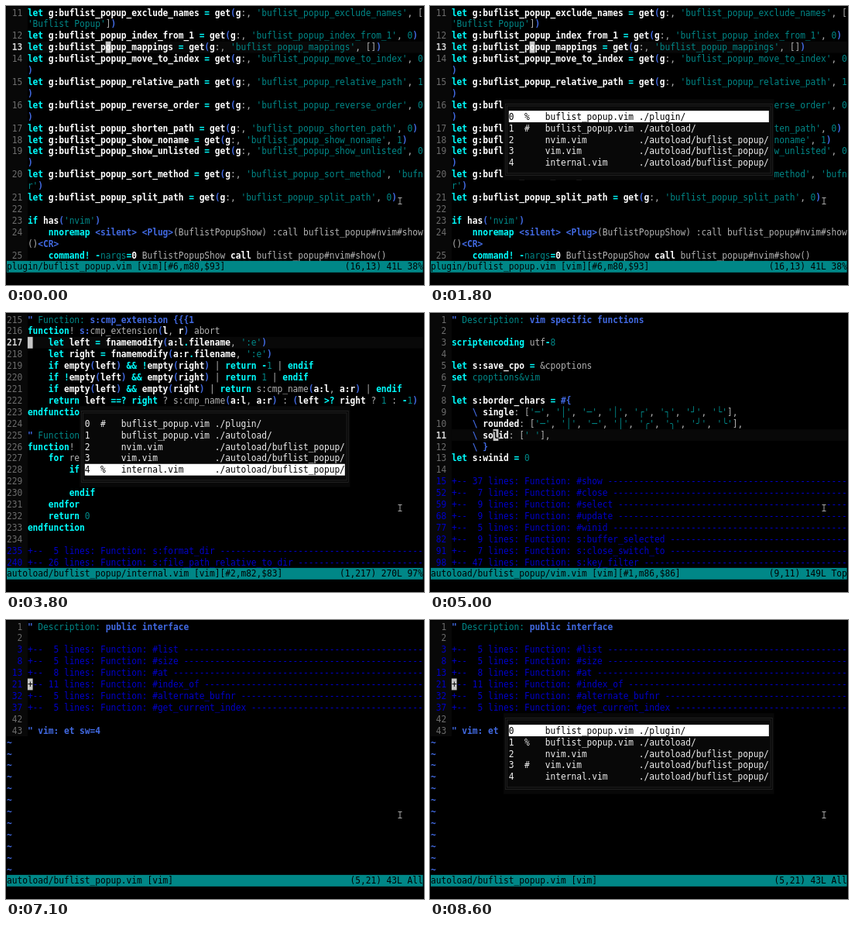
An HTML page with a canvas that plays this animation: 540 px wide and 360 px high, repeating every 10000 ms.

```html
<!DOCTYPE html>
<html lang="en">
<head>
<meta charset="utf-8">
<title>Buffer list popup</title>
<style>
html, body { margin: 0; width: 100%; height: 100%; overflow: hidden; background: #000; }
canvas { display: block; width: 540px; height: 360px; }
</style>
</head>
<body>
<canvas id="stage" width="540" height="360"></canvas>
<script>
const ctx = document.getElementById('stage').getContext('2d');
const LOOP = 10000, COLS = 80, GUTTER = 4, STATUS_ROW = 22;
const CW = 9, CH = 18, BASE = 14;
const FONT = '15px "DejaVu Sans Mono", monospace';

// Style letters follow a "§" in the text below.
const STYLES = {
  n: ['#b2b2b2'], s: ['#008787'], k: ['#00ffff', 1], b: ['#ffffff', 1],
  o: ['#4169e1', 1], f: ['#0000c8'], g: ['#6c6c6c'], G: ['#d0d0d0', 1]
};

const fold = (count, name) => ({ count, name });
const option = (name, value) =>
  `§klet §bg:buflist_popup_${name} §k= §bget§o(§bg§n:, §s'buflist_popup_${name}'§n, ${value}§o)`;
const heading = (label, text) => `§o" §s${label}: §o${text}`;
const func = (name, a, b) => `§kfunction§n! §os:§n${name}§o(§b${a}§n, §b${b}§o) §nabort`;
const call = (fn, arg) => `§b${fn}§o(§b${arg}§o)`;
const side = (name, arg) =>
  `    §klet §b${name} §k= §bfnamemodify§o(§ba:${arg}§k.§bfilename§n, §s':e'§o)`;
const cmpName = '§ns:cmp_name§o(§ba:l§n, §ba:r§o)';
const guard = (l, r, result) =>
  `    §kif ${l}${call('empty', 'left')} §k&& ${r}${call('empty', 'right')} §n| §kreturn ${result} §n| §kendif`;
const borders = (name, chars) =>
  `    §o\\ §b${name}§n: [` + [...chars].map(c => `§s'${c}'`).join('§n, ') + '§n],';

const views = {
  plugin: {
    first: 11, row: 3, col: 19, fill: 'let',
    path: 'plugin/buflist_popup.vim [vim][#6,m80,$93]', pos: '(16,13) 41L 38%',
    lines: [
      option('exclude_names', "[§s'Buflist Popup'§n]"),
      option('index_from_1', '§s0'),
      option('mappings', '[]'),
      option('move_to_index', '§s0'),
      option('relative_path', '§s1'),
      option('reverse_order', '§s0'),
      option('shorten_path', '§s0'),
      option('show_noname', '§s1'),
      option('show_unlisted', '§s0'),
      option('sort_method', "§s'bufnr'"),
      option('split_path', '§s0'),
      '',
      "§kif §bhas§o(§s'nvim'§o)",
      '    §knnoremap §o<silent> <Plug>§n(BuflistPopupShow) :call buflist_popup#nvim#show()§o<CR>',
      '    §kcommand! -§snargs§k=§b0 §nBuflistPopupShow §bcall §nbuflist_popup#nvim#show()'
    ]
  },
  internal: {
    first: 215, row: 2, col: 4,
    path: 'autoload/buflist_popup/internal.vim [vim][#2,m82,$83]', pos: '(1,217) 270L 97%',
    lines: [
      heading('Function', 's:cmp_extension {{{1'),
      func('cmp_extension', 'l', 'r'),
      side('left', 'l'),
      side('right', 'r'),
      guard('', '§k!', '§k-§s1'),
      guard('§k!', '', '§s1'),
      guard('', '', cmpName),
      `    §kreturn §bleft §k==? right §n? ${cmpName} §n: §o(§bleft §k>? §bright §n? §s1 §n: §k-§s1§o)`,
      '§kendfunction',
      '',
      heading('Function', 's:match_from_list {{{1'),
      func('match_from_list', 'name', 'list'),
      '    §kfor §nregex §kin §ba:list',
      '        §kif §ba:name §k=~ §nregex',
      '            §kreturn §s1',
      '        §kendif',
      '    §kendfor',
      '    §kreturn §s0',
      '§kendfunction',
      '',
      fold(5, 's:format_dir'),
      fold(26, 's:file_path_relative_to_dir')
    ]
  },
  vim: {
    first: 1, row: 10, col: 12,
    path: 'autoload/buflist_popup/vim.vim [vim][#1,m86,$86]', pos: '(9,11) 149L Top',
    lines: [
      heading('Description', 'vim specific functions'),
      '',
      '§kscriptencoding §nutf§k-§s8',
      '',
      '§klet §bs:save_cpo §k= §n&cpoptions',
      '§kset §scpoptions&vim',
      '',
      '§klet §bs:border_chars §k= §o#{',
      borders('single', '─│─│┌┐┘└'),
      borders('rounded', '─│─│╭╮╯╰'),
      borders('solid', ' '),
      '    §o\\ }',
      '§klet §bs:winid §k= §s0',
      '',
      fold(37, '#show'), fold(7, '#close'), fold(9, '#select'), fold(9, '#update'),
      fold(5, '#winid'), fold(9, 's:buffer_selected'), fold(7, 's:close_switch_to'),
      fold(47, 's:key_filter')
    ]
  },
  autoload: {
    first: 1, row: 5, col: 4,
    path: 'autoload/buflist_popup.vim [vim]', pos: '(5,21) 43L All',
    lines: [
      heading('Description', 'public interface'),
      '',
      fold(5, '#list'), fold(5, '#size'), fold(8, '#at'), fold(11, '#index_of'),
      fold(5, '#alternate_bufnr'), fold(5, '#get_current_index'),
      '',
      '§o" vim: et sw=4'
    ]
  }
};

const buffers = [
  ['buflist_popup.vim', './plugin/'],
  ['buflist_popup.vim', './autoload/'],
  ['nvim.vim', './autoload/buflist_popup/'],
  ['vim.vim', './autoload/buflist_popup/'],
  ['internal.vim', './autoload/buflist_popup/']
];

// [start ms, view, current, alternate, selected]; no selection means no popup
const timeline = [
  [0, 'plugin'],
  [800, 'plugin', 0, 1, 0],
  [2400, 'plugin', 0, 1, 4],
  [2700, 'internal'],
  [3500, 'internal', 4, 0, 4],
  [4200, 'internal', 4, 0, 3],
  [4500, 'vim'],
  [5300, 'vim', 3, 4, 3],
  [6200, 'vim', 3, 4, 1],
  [6500, 'autoload'],
  [7200, 'autoload', 1, 3, 1],
  [8400, 'autoload', 1, 3, 0]
];

const cells = (text, style = 'n') => text.split('§').flatMap((part, i) => {
  if (i) style = part[0];
  return [...(i ? part.slice(1) : part)].map(ch => [ch, style]);
});

// Turns the lines of a view into screen rows of [character, style].
function layout(view) {
  const rows = [], width = COLS - GUTTER;
  let num = view.first;
  for (const line of view.lines) {
    const here = rows.length === view.row;
    const label = String(num).padStart(3) + ' ';
    if (line.count) {
      const text = `${label}+--${String(line.count).padStart(3)} lines: Function: ${line.name} `;
      rows.push(cells(text.padEnd(COLS, '-'), 'f'));
      num += line.count;
      continue;
    }
    const body = cells(line);
    rows.push([...cells(label, here ? 'G' : 'g'), ...body.slice(0, width)]);
    for (let i = width; i < body.length; i += width)
      rows.push([...cells(' '.repeat(GUTTER)), ...body.slice(i, i + width)]);
    num++;
  }
  view.used = rows.length;
  while (rows.length < STATUS_ROW) rows.push(cells('~', 'o'));
  view.rows = rows;
}
Object.values(views).forEach(layout);

function box(col, row, w, h, color) {
  ctx.fillStyle = color;
  ctx.fillRect(col * CW, row * CH, w * CW, h * CH);
}

function glyph(ch, col, row, color, bold) {
  if (ch === ' ') return;
  ctx.font = (bold ? 'bold ' : '') + FONT;
  ctx.fillStyle = color;
  ctx.fillText(ch, col * CW, row * CH + BASE);
}

const print = (text, col, row, color) =>
  [...text].forEach((ch, i) => glyph(ch, col + i, row, color));

function drawView(view) {
  box(0, 0, GUTTER, view.used, '#080808');
  if (view.rows[view.row][0][1] !== 'f') box(GUTTER, view.row, COLS - GUTTER, 1, '#080808');
  view.rows.forEach((row, y) => row.forEach(([ch, s], x) => glyph(ch, x, y, ...STYLES[s])));

  const under = view.rows[view.row][view.col] || [' ', 'n'];
  box(view.col, view.row, 1, 1, '#c6c6c6');
  glyph(under[0], view.col, view.row, view.fill ? '#ffffff' : '#000000', STYLES[under[1]][1]);

  box(0, STATUS_ROW, COLS, 1, '#008787');
  print(view.path, 0, STATUS_ROW, '#000000');
  print(view.pos, COLS - view.pos.length, STATUS_ROW, '#000000');
}

function drawPopup(current, alternate, selected) {
  const left = 14, top = 8, w = 52, h = 7;
  box(left, top, w, h, '#080808');
  ctx.strokeStyle = '#262626';
  ctx.lineWidth = 1;
  for (const d of [-1.5, 1.5])
    ctx.strokeRect((left + .5) * CW + d, (top + .5) * CH + d, (w - 1) * CW - 2 * d, (h - 1) * CH - 2 * d);
  buffers.forEach(([name, path], i) => {
    const flag = i === current ? '%' : i === alternate ? '#' : ' ';
    const row = top + 1 + i, on = i === selected;
    if (on) box(left + 1, row, w - 2, 1, '#ffffff');
    print(`${i}  ${flag}   ${name.padEnd(18)}${path}`, left + 1, row, on ? '#000000' : '#eeeeee');
  });
}

function drawPointer() {
  ctx.strokeStyle = '#a8a8a8';
  ctx.lineWidth = 1;
  ctx.beginPath();
  ctx.moveTo(506.5, 247.5); ctx.lineTo(511.5, 247.5);
  ctx.moveTo(509, 247.5); ctx.lineTo(509, 255.5);
  ctx.moveTo(506.5, 255.5); ctx.lineTo(511.5, 255.5);
  ctx.stroke();
}

function draw([, name, current, alternate, selected]) {
  ctx.setTransform(1, 0, 0, 1, 0, 0);
  ctx.fillStyle = '#000';
  ctx.fillRect(0, 0, 540, 360);
  // 720 x 432 terminal fitted to the stage
  ctx.setTransform(.7467, 0, 0, .828, 1, 1);
  drawView(views[name]);
  if (selected !== undefined) drawPopup(current, alternate, selected);
  ctx.setTransform(1, 0, 0, 1, 0, 0);
  drawPointer();
}

let shown;
function tick() {
  const t = performance.now() % LOOP;
  const step = timeline.findLast(s => s[0] <= t);
  if (step !== shown) draw(shown = step);
  requestAnimationFrame(tick);
}
tick();
</script>
</body>
</html>
```
